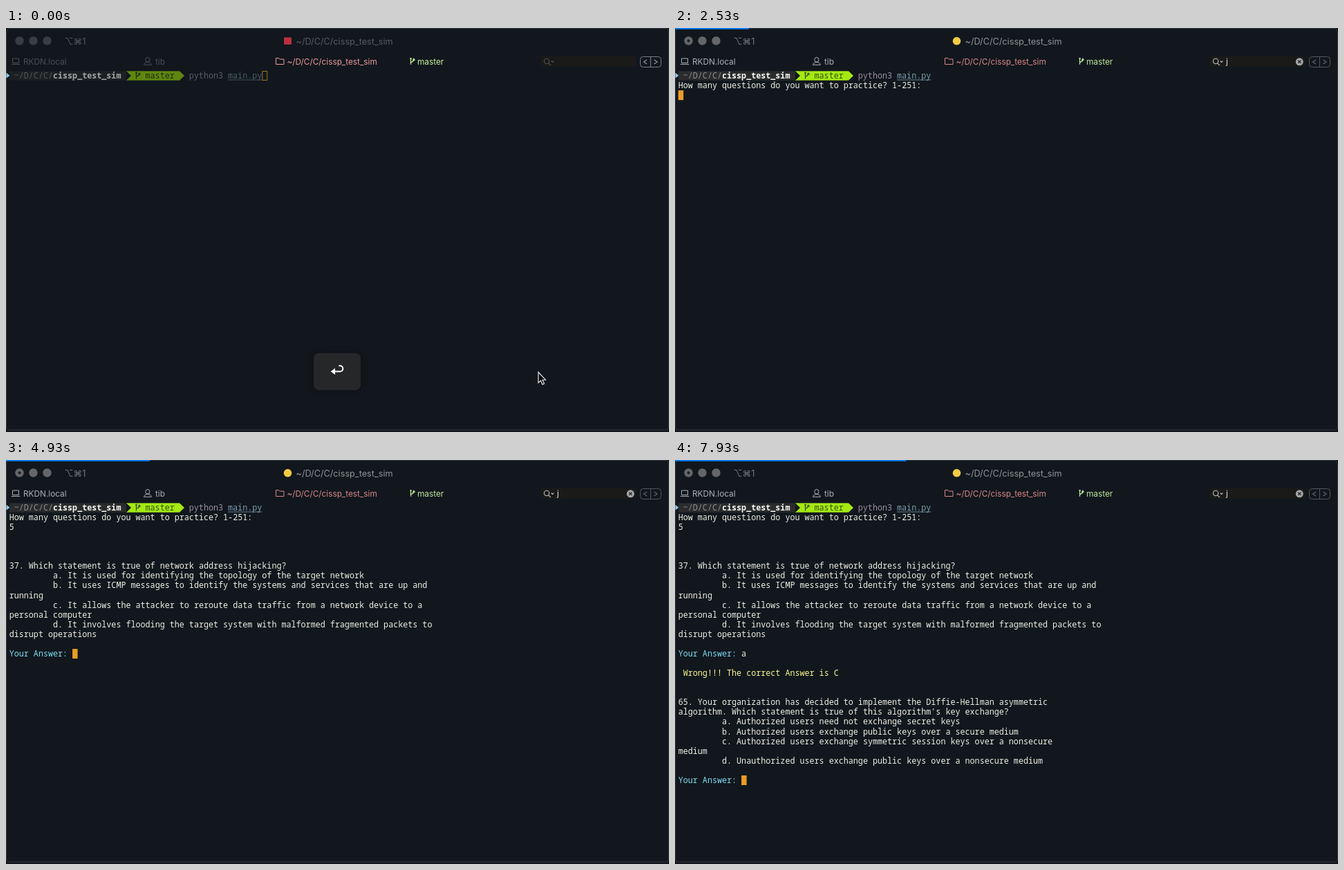
These frames come from a looping animation (959 by 584 pixels, 8 s). An HTML page with a canvas:

```html
<!DOCTYPE html>
<html lang="en">
<head>
<meta charset="utf-8">
<title>Terminal quiz</title>
<style>
html, body { margin: 0; width: 100%; height: 100%; overflow: hidden; background: #11171d; }
canvas { display: block; width: 959px; height: 584px; }
</style>
</head>
<body>
<canvas id="stage" width="959" height="584"></canvas>
<script>
const ctx = document.getElementById('stage').getContext('2d');
const LOOP = 8000, TICK = 1000 / 15;
const COL = 7.03, ROW = 14.07, LEFT = 4.7, TOP = 62;
const MONO = '"Noto Sans Mono", "DejaVu Sans Mono", monospace';
const SANS = 'Inter, "DejaVu Sans", sans-serif';
const BG = '#11171d', INK = '#f0f1e4', CYAN = '#7ddcf4', YELLOW = '#f8f88e', ORANGE = '#eb9c27';

// Moments of the session, in ms
const FOCUS = 200, RUN = 600, ASK = 1530, JOB = 2000, COUNT = 3800, FIRST = 4200, ANSWER = 6530, SECOND = 7470;

const INDENT = ' '.repeat(9);
const firstQuestion = [
  '37. Which statement is true of network address hijacking?',
  INDENT + 'a. It is used for identifying the topology of the target network',
  INDENT + 'b. It uses ICMP messages to identify the systems and services that are up and',
  'running',
  INDENT + 'c. It allows the attacker to reroute data traffic from a network device to a',
  'personal computer',
  INDENT + 'd. It involves flooding the target system with malformed fragmented packets to',
  'disrupt operations'
];
const secondQuestion = [
  '65. Your organization has decided to implement the Diffie-Hellman asymmetric',
  "algorithm. Which statement is true of this algorithm's key exchange?",
  INDENT + 'a. Authorized users need not exchange secret keys',
  INDENT + 'b. Authorized users exchange public keys over a secure medium',
  INDENT + 'c. Authorized users exchange symmetric session keys over a nonsecure',
  'medium',
  INDENT + 'd. Unauthorized users exchange public keys over a nonsecure medium'
];

const colX = c => LEFT + c * COL;
const rowY = r => TOP + r * ROW;

function label(text, x, y, size, color) {
  ctx.font = `${size}px ${SANS}`;
  ctx.fillStyle = color;
  ctx.fillText(text, x, y);
}

function mono(text, col, row, color, weight = 500) {
  ctx.font = `${weight} 11.72px ${MONO}`;
  ctx.fillStyle = color;
  ctx.fillText(text, colX(col), rowY(row) + 10.9);
}

function lines(list, row) {
  list.forEach((text, i) => {
    const lead = text.length - text.trimStart().length;
    mono(text.trimStart(), lead, row + i, INK);
  });
}

function box(x, y, w, h, color) {
  ctx.fillStyle = color;
  ctx.fillRect(x, y, w, h);
}

function disc(x, y, r, color) {
  ctx.fillStyle = color;
  ctx.beginPath();
  ctx.arc(x, y, r, 0, Math.PI * 2);
  ctx.fill();
}

function stroke(d, color, width = 1) {
  ctx.strokeStyle = color;
  ctx.lineWidth = width;
  ctx.stroke(new Path2D(d));
}

function shape(d, color) {
  ctx.fillStyle = color;
  ctx.fill(new Path2D(d));
}

function rounded(x, y, w, h, r) {
  ctx.beginPath();
  ctx.roundRect(x, y, w, h, r);
}

function block(col, row) {
  box(colX(col), rowY(row), 7.5, 14, ORANGE);
}

function branch(x, y, color) {
  stroke(`M${x + 1.5} ${y}v9.5M${x + 1.5} ${y + 7}c0-2 4.5-1 4.5-4.5`, color, 1.3);
  shape(`M${x + 3.6} ${y + 3.5}h4.6l-2.3-3.5z`, color);
  disc(x + 1.5, y + 0.8, 1.2, color);
}

function windowFrame() {
  box(0, 0, 959, 584, BG);
  ctx.strokeStyle = '#343a3f';
  ctx.lineWidth = 1;
  rounded(0.5, 0.5, 958, 580.5, 5);
  ctx.stroke();
}

function titleBar(active, job) {
  for (const x of [19.5, 39.5, 59.5]) disc(x, 18.5, 6.2, active ? '#646668' : '#3a3e43');
  if (job) disc(19.5, 18.5, 2, '#1a1d20');
  const color = active ? '#929496' : '#595c60';
  label('⌥⌘1', 84.5, 23.5, 12.7, active ? '#74777a' : '#54585c');
  if (job) {
    disc(407.5, 18.8, 5.8, '#f3ca45');
  } else {
    ctx.fillStyle = active ? '#cb3347' : '#b92f41';
    rounded(402, 13.5, 11, 10.5, 1.5);
    ctx.fill();
  }
  label('~/D/C/C/cissp_test_sim', 419.5, 23.5, 12.7, color);
}

function statusBar(active) {
  const grey = active ? '#aeb0b2' : '#4a4e53';
  const pink = active ? '#d98788' : '#eb9b9b';
  const lime = active ? '#bfe99d' : '#c8f59e';

  stroke('M9.5 44h9v6.5h-9zM7.8 52.5h12.4', grey);
  label('RKDN.local', 25, 52.7, 11.8, grey);

  stroke('M201.8 45.8a3.1 3.3 0 1 0 6.2 0a3.1 3.3 0 1 0-6.2 0M199.5 53.3c0-5 10.8-5 10.8 0z', grey);
  label('tib', 216, 52.7, 11.8, grey);

  stroke('M390.5 52.5v-9h4l1.3 1.6h6.2v7.4z', pink);
  label('~/D/C/C/cissp_test_sim', 406.5, 52.7, 11.8, pink);

  branch(584, 43.3, lime);
  label('master', 595, 52.7, 11.8, lime);

  box(774, 41, 137, 15, '#1a1a19');
  const lens = active ? '#c2c3c4' : '#4f5154';
  stroke('M778.4 48a3.7 3.7 0 1 0 7.4 0a3.7 3.7 0 1 0-7.4 0M784.7 50.8l3.3 3.4M788.6 47.6l1.9 1.9 1.9-1.9', lens, 1.1);
  if (active) {
    label('j', 797, 52.7, 12, '#e6e6e6');
    disc(903.3, 48.8, 5.5, '#a4a5a6');
    stroke('M901.2 46.7l4.2 4.2M905.4 46.7l-4.2 4.2', '#1a1c1f', 1.3);
  }

  const edge = active ? '#53575b' : '#7d8083';
  ctx.strokeStyle = edge;
  ctx.lineWidth = 1;
  rounded(917.5, 41.5, 30, 15, 4);
  ctx.stroke();
  stroke('M932.5 42v14', edge);
  stroke('M927 46l-4.5 3 4.5 3M937.5 46l4.5 3-4.5 3', active ? '#62666a' : '#9a9da0', 1.1);
}

function prompt(active) {
  const dark = active ? '#292b2c' : '#1c2023';
  const green = active ? '#a4e913' : '#5f870f';
  const leaf = active ? '#355012' : '#1d2c0b';
  const top = 62.3, mid = 69, end = 75.7;

  shape('M0.5 64.8l5 3.9-5 3.9z', '#8dcbe8');
  box(5, top, 169, end - top, dark);
  box(174, top, 77, end - top, green);
  shape(`M174 ${top}L181 ${mid}L174 ${end}z`, BG);
  shape(`M251 ${top}L258 ${mid}L251 ${end}z`, green);

  mono('~/D/C/C/', 1, 0, active ? '#8d8f8e' : '#54575a');
  mono('cissp_test_sim', 9, 0, active ? '#f7f7f2' : '#a3a5a5', 700);
  branch(187, 64, leaf);
  mono('master', 28, 0, leaf);
  mono('python3', 37, 0, active ? '#9c8ea2' : '#5b5d66');
  const link = active ? '#7d9fb4' : '#4b5c69';
  mono('main.py', 45, 0, link);
  box(colX(45), 74.6, COL * 7, 0.8, link);
}

function output(t) {
  if (t < RUN) {
    if (t < FOCUS) stroke('M370.9 62.5h6.8v13h-6.8z', '#a67321');
    else block(52, 0);
    return;
  }
  if (t < ASK) return block(0, 1);
  mono('How many questions do you want to practice? 1-251:', 0, 1, INK);
  if (t < COUNT) return block(0, 2);
  mono('5', 0, 2, INK);
  if (t < FIRST) return block(1, 2);

  lines(firstQuestion, 6);
  mono('Your Answer:', 0, 15, CYAN);
  if (t < ANSWER) return block(13, 15);
  mono('a', 13, 15, INK);
  if (t < SECOND) return block(14, 15);

  mono('Wrong!!! The correct Answer is C', 1, 17, YELLOW);
  lines(secondQuestion, 20);
  mono('Your Answer:', 0, 28, CYAN);
  block(13, 28);
}

function keycap(t) {
  const alpha = Math.min(1, Math.max(0, (600 - t) / 400));
  if (!alpha) return;
  ctx.save();
  ctx.globalAlpha = alpha;
  ctx.shadowColor = 'rgba(0,0,0,.35)';
  ctx.shadowBlur = 8;
  ctx.fillStyle = '#262729';
  rounded(445, 470, 68, 53.5, 8);
  ctx.fill();
  ctx.shadowColor = 'transparent';
  stroke('M474.5 496.5h8.7a4.1 4.1 0 0 0 0-8.2h-1.8', '#fff', 2);
  shape('M469.8 496.5l6.2-4.7v9.4z', '#fff');
  ctx.restore();
}

function pointer() {
  const d = 'M770 497.5v15.4l3.5-3.2 2.4 5.5 2.6-1.1-2.4-5.4h4.4z';
  shape(d, '#0a0c0e');
  stroke(d, '#f2f2f2', 1.1);
}

function draw(now) {
  const step = Math.floor((now % LOOP + 4) / TICK) % 120;
  const t = step * TICK;
  const active = t >= FOCUS;
  windowFrame();
  titleBar(active, t >= JOB);
  statusBar(active);
  prompt(active);
  output(t);
  keycap(t);
  if (t < RUN) pointer();
  box(0, 0, step * 2.81, 2, '#0a74f0');
}

let start;
function loop(now) {
  start ??= now;
  draw(now - start);
  requestAnimationFrame(loop);
}
draw(0);
requestAnimationFrame(loop);
</script>
</body>
</html>
```
